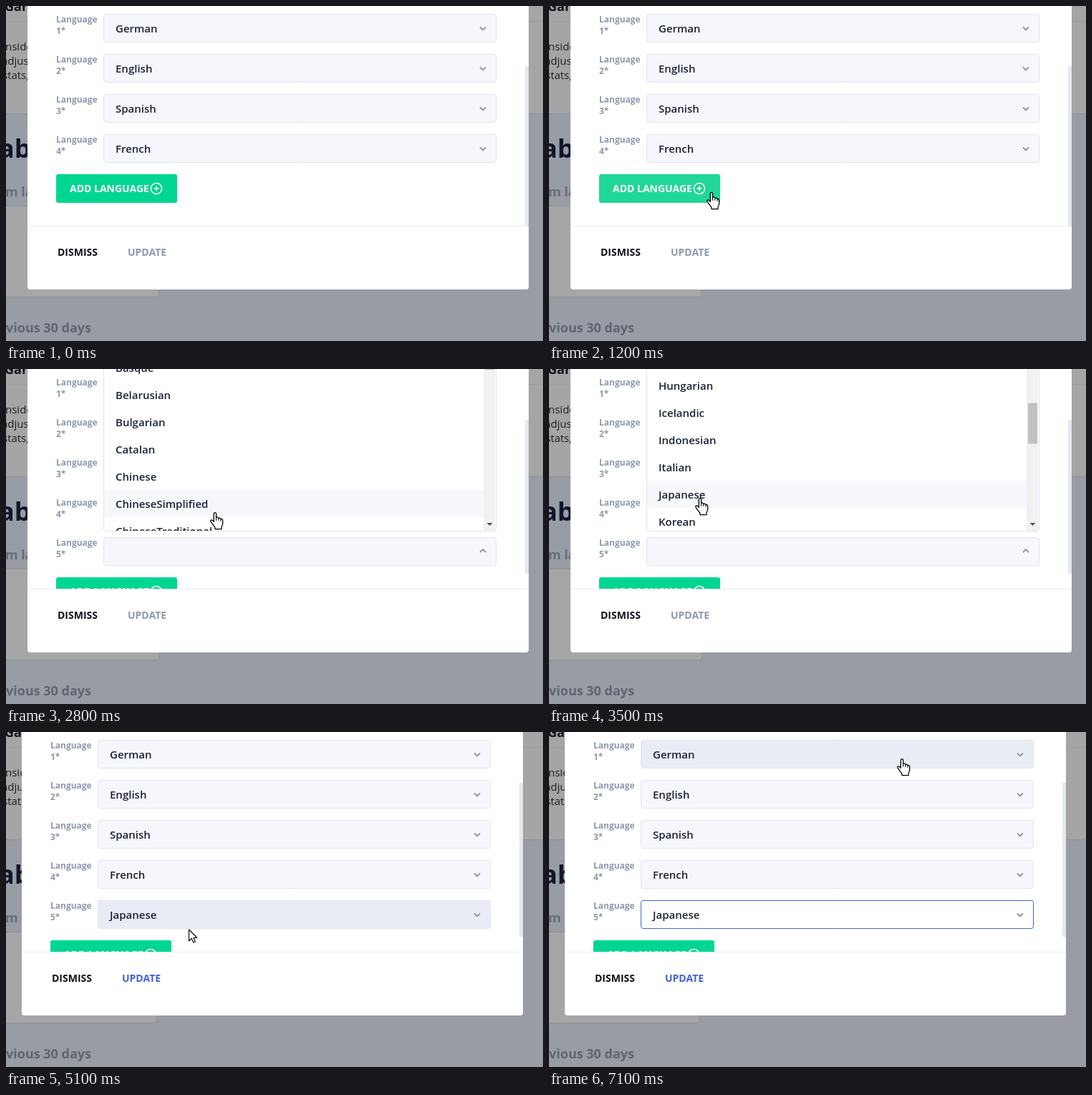
Animation of 750x468 px, one loop 7200 ms. Source, as an HTML page with a canvas:

```html
<!DOCTYPE html>
<html lang="en">
<head>
<meta charset="utf-8">
<title>Language settings</title>
<style>
html, body { margin: 0; width: 100%; height: 100%; overflow: hidden; background: #999ca5; }
canvas { display: block; }
</style>
</head>
<body>
<canvas id="stage" width="750" height="468"></canvas>
<script>
const ctx = document.getElementById('stage').getContext('2d');
const LOOP = 7200, STEP = 100, HOVER_LAG = 100;
const ADD = 1600, OPEN = 2100, PICK = 4400;
const ROW_H = 56, ITEM_H = 38, SCROLL_END = 545;
const FONT = '"Open Sans", "Noto Sans", sans-serif';
const INK = '#1c2237', MUTED = '#8f99ad', BLUE = '#4062d8';

const chosen = ['German', 'English', 'Spanish', 'French'];
const options = ['Arabic', 'Basque', 'Belarusian', 'Bulgarian', 'Catalan', 'Chinese',
  'ChineseSimplified', 'ChineseTraditional', 'Croatian', 'Czech', 'Danish', 'Dutch',
  'Estonian', 'Finnish', 'Greek', 'Hebrew', 'Hungarian', 'Icelandic', 'Indonesian',
  'Italian', 'Japanese', 'Korean', 'Latvian'];

// Pointer hot spot: time, x, y
const track = [
  [0, 760, 490], [100, 705, 469], [400, 560, 400], [700, 400, 325], [1000, 235, 266],
  [1200, 227, 260], [1400, 229, 259], [1600, 236, 252], [1700, 239, 242], [2000, 244, 251],
  [2200, 245, 252], [2600, 258, 228], [2700, 282, 203], [2800, 292, 200], [3300, 216, 182],
  [3500, 211, 180], [3700, 211, 180], [4100, 217, 166], [4400, 217, 166], [4700, 225, 190],
  [5000, 250, 262], [5100, 255, 275.5], [5300, 262, 284], [5600, 275, 286], [5750, 275, 286],
  [6000, 430, 112], [6200, 455, 98], [6500, 570, 54], [6700, 585, 42], [7000, 503, 37],
  [7100, 493, 37], [7200, 493, 37]
];

const handShape = new Path2D('M5 2Q5 .5 6.5 .5T8 2V7Q8.5 6.3 9.5 6.5T11 8Q11.5 7.3 12.5 7.6T14 9Q14.5 8.5 15.5 9T16.5 11V15Q16.5 17 15 19V22H6.5V20L2 14Q.5 12 .7 10.8Q2 9.5 3.5 11L5 12.5Z');
const handLines = new Path2D('M8 7V11M11 8V11M14 9V12');
const arrowShape = new Path2D('M.5 .5V16.5L4.2 13L6.7 18.6L9.3 17.5L6.9 12H11.8Z');

const clamp = v => Math.max(0, Math.min(1, v));
const inside = (p, x, y, w, h) => p.x >= x && p.x < x + w && p.y >= y && p.y < y + h;

function pointerAt(t) {
  const i = Math.max(1, track.findIndex(k => k[0] >= t));
  const [t0, x0, y0] = track[i - 1], [t1, x1, y1] = track[i];
  const u = clamp((t - t0) / (t1 - t0));
  return { x: x0 + (x1 - x0) * u, y: y0 + (y1 - y0) * u };
}

function scrollAt(t) {
  const u = clamp((t - 2850) / 450);
  return SCROLL_END * u * u * (3 - 2 * u);
}

function rect(x, y, w, h, color) {
  ctx.fillStyle = color;
  ctx.fillRect(x, y, w, h);
}

function box(x, y, w, h, r, fill, stroke) {
  ctx.beginPath();
  ctx.roundRect(x, y, w, h, r);
  ctx.fillStyle = fill;
  ctx.fill();
  if (stroke) line(stroke, 1);
}

function line(color, width, path) {
  ctx.strokeStyle = color;
  ctx.lineWidth = width;
  path ? ctx.stroke(path) : ctx.stroke();
}

function text(str, x, y, size, weight, color) {
  ctx.font = `${weight} ${size}px ${FONT}`;
  ctx.fillStyle = color;
  ctx.fillText(str, x, y);
}

function clipTo(x, y, w, h, draw) {
  ctx.save();
  ctx.beginPath();
  ctx.rect(x, y, w, h);
  ctx.clip();
  draw();
  ctx.restore();
}

function drawPage(shifted) {
  rect(0, 0, 750, 468, '#999ca5');
  rect(0, 0, 750, 150, '#a5a5a6');
  rect(0, 21, 750, 1, '#9b9ca0');
  rect(0, 150, 750, 1, '#8c8f97');
  text('Gar', -2, 7, 18, 700, '#10131d');
  ['nside', 'adjus', 'stats,'].forEach((s, i) =>
    text(s, [-1, -6, -5][i], 62 + i * 20, 15, 400, '#1d1f26'));
  text('abo', -10, 212, 36, 700, '#10162a');
  text('m la', -1, 266, 18, 700, '#666b78');
  box(-5.5, 279.5, shifted ? 216 : 219, 127, 3, '#a6a6a7', '#8e919a');
  text('vious 30 days', 0, 456, 18, 700, '#5f6471');
}

function chevron(x, y, dir) {
  ctx.beginPath();
  ctx.moveTo(x - 4, y - 2 * dir);
  ctx.lineTo(x, y + 2 * dir);
  ctx.lineTo(x + 4, y - 2 * dir);
  line('#8a93a6', 1.8);
}

function drawField(i, value, { hot, focused, open }) {
  const y = 11 + i * ROW_H;
  text('Language', 70, y + 12, 12, 700, MUTED);
  text(`${i + 1}*`, 70, y + 28, 12, 700, MUTED);
  const fill = hot ? '#e9ecf5' : focused ? '#ffffff' : '#f6f7fc';
  box(136.5, y + .5, 548, 39, 3, fill, focused && !hot ? BLUE : '#e0e4ee');
  text(value, 153, y + 26, 15, 600, INK);
  chevron(666, y + (open ? 19 : 20.5), open ? -1 : 1);
}

function drawAddButton(y, fill, ring) {
  if (ring) box(65.5, y - 4.5, 178, 49, 6, '#e8eaf1');
  box(70, y, 169, 40, 3, fill);
  text('ADD LANGUAGE', 89, y + 25, 14, 700, '#fff');
  ctx.beginPath();
  ctx.arc(210, y + 20, 7.6, 0, Math.PI * 2);
  line('#fff', 1.5);
  rect(206.5, y + 19.25, 7, 1.5, '#fff');
  rect(209.25, y + 16.5, 1.5, 7, '#fff');
}

function drawList(scroll, hovered, pressed) {
  box(136.5, -72.5, 548, 299, 3, '#fff', '#e0e4ee');
  clipTo(137, 0, 547, 226, () => {
    options.forEach((name, i) => {
      const top = -59 + i * ITEM_H - scroll;
      if (i === hovered) rect(137, top, 530, ITEM_H, pressed ? '#ebecf1' : '#f6f8fb');
      text(name, 153, top + 25, 15, 600, INK);
    });
    rect(667, 0, 16, 226, '#f1f1f1');
    rect(669, -56 + scroll * .19, 13, 57, '#c1c1c1');
    ctx.beginPath();
    ctx.moveTo(671.5, 215);
    ctx.lineTo(679.5, 215);
    ctx.lineTo(675.5, 219);
    ctx.fillStyle = '#505050';
    ctx.fill();
  });
}

function drawPointer(p, hand) {
  ctx.save();
  ctx.fillStyle = '#fff';
  ctx.lineJoin = 'round';
  if (hand) {
    ctx.translate(p.x - 7, p.y);
    ctx.scale(1.07, 1.07);
    ctx.fill(handShape);
    line('#000', 1.2, handShape);
    line('#000', 1, handLines);
  } else {
    ctx.translate(p.x, p.y);
    ctx.fill(arrowShape);
    line('#000', 1.1, arrowShape);
  }
  ctx.restore();
}

// Which control lies under a point given in modal coordinates
function hit(p, s) {
  if (s.open && inside(p, 137, 0, 530, 226))
    return { item: Math.floor((p.y + 59 + s.scroll) / ITEM_H) };
  for (let i = 0; i < s.rows; i++)
    if (inside(p, 136, 11 + i * ROW_H, 549, 40)) return { row: i };
  if (p.y < 307 && inside(p, 70, s.buttonY, 169, 40)) return { button: true };
  return {};
}

function draw(t) {
  const added = t >= ADD, picked = t >= PICK;
  const dx = picked ? -8 : 0;
  const s = {
    rows: added ? 5 : 4,
    buttonY: added ? 291 : 235,
    open: t >= OPEN && !picked,
    scroll: scrollAt(t)
  };
  const local = p => ({ x: p.x - dx, y: p.y });
  const pointer = pointerAt(t);
  const hover = hit(local(pointerAt(Math.max(0, t - HOVER_LAG))), s);
  const over = hit(local(pointer), s);
  const clicked = t >= 1500 && t < OPEN;

  ctx.clearRect(0, 0, 750, 468);
  drawPage(picked);
  ctx.save();
  ctx.translate(dx, 0);
  box(30, -10, 700, 406, 4, '#fff');

  clipTo(30, 0, 700, 307, () => {
    for (let i = 0; i < s.rows; i++) {
      const last = i === 4;
      drawField(i, last ? (picked ? 'Japanese' : '') : chosen[i], {
        hot: hover.row === i && !s.open,
        focused: last && picked,
        open: last && s.open
      });
    }
    const green = clicked ? '#00b786' : hover.button ? '#1fd796' : '#00d691';
    drawAddButton(s.buttonY, green, clicked);
    if (s.open) drawList(s.scroll, hover.item, t >= 4200);
  });

  rect(30, 307, 700, 1, '#eaedf3');
  rect(725, added ? 71 : 84, 5, added ? 215 : 224, '#e4e8f1');
  text('DISMISS', 72, 349, 14, 700, '#0e1118');
  text('UPDATE', 170, 349, 14, 700, picked ? BLUE : MUTED);
  ctx.restore();

  if (t >= 100) drawPointer(pointer, Object.keys(over).length > 0);
}

function tick(now) {
  draw(Math.floor((now % LOOP) / STEP) * STEP);
  requestAnimationFrame(tick);
}
requestAnimationFrame(tick);
</script>
</body>
</html>
```
